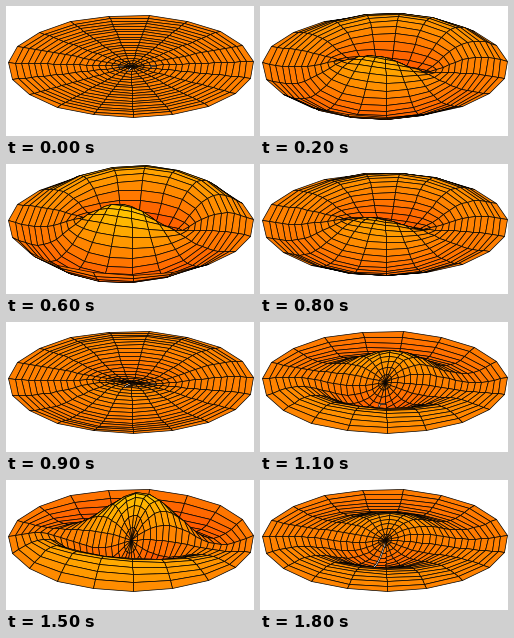
Write a matplotlib script that moves like this. It is 248 by 130 pixels and loops after 1900 ms.

```python
import numpy as np
import matplotlib.pyplot as plt
from matplotlib.animation import FuncAnimation
from matplotlib.collections import PolyCollection

W, H, DPI = 248, 130, 72
FRAMES, INTERVAL = 19, 100
N = 20                       # grid points along radius and angle
ZERO = 7.0156                # second zero of the Bessel function J1
CENTER = (125.2, 60.3)
SCALE_X, SCALE_DEPTH, SCALE_Z = 122.8, 51.0, 60.0
AZIMUTH = np.radians(108)


def bessel1(x):
    tau = (np.arange(200) + 0.5) * np.pi / 200
    return np.cos(tau - x[..., None] * np.sin(tau)).mean(axis=-1)


def quads(grid):
    """Corner values of every mesh cell, shape (cells, 4)."""
    corners = (grid[:-1, :-1], grid[1:, :-1], grid[1:, 1:], grid[:-1, 1:])
    return np.stack([c.ravel() for c in corners], axis=1)


def snap(values):
    """Move coordinates to pixel centres so that thin lines stay crisp."""
    return np.floor(values) + 0.5


r, theta = np.meshgrid(np.linspace(0, 1, N), np.linspace(0, 2 * np.pi, N))
x, y = r * np.cos(theta), r * np.sin(theta)
mode = bessel1(ZERO * r) * np.cos(theta)

across = x * np.cos(AZIMUTH) + y * np.sin(AZIMUTH)
depth = -x * np.sin(AZIMUTH) + y * np.cos(AZIMUTH)

# Paint cells from back to front.
order = np.argsort(-quads(depth).mean(axis=1))
screen_x = quads(CENTER[0] + SCALE_X * across)[order]
flat_y = quads(CENTER[1] - SCALE_DEPTH * depth)[order]
height = quads(mode)[order]

fig = plt.figure(figsize=(W / DPI, H / DPI), dpi=DPI, facecolor="white")
ax = fig.add_axes([0, 0, 1, 1])
ax.set_xlim(0, W)
ax.set_ylim(H, 0)
ax.axis("off")

drum = PolyCollection([], edgecolors="black", linewidths=0.7,
                      joinstyle="round", cmap="autumn")
drum.set_clim(-1, 1)
ax.add_collection(drum)


def update(i):
    z = height * np.sin(2 * np.pi * i / FRAMES)
    corners = np.stack([screen_x, flat_y - SCALE_Z * z], axis=-1)
    drum.set_verts(snap(corners))
    drum.set_array(z[:, 0])
    return (drum,)


anim = FuncAnimation(fig, update, frames=FRAMES, interval=INTERVAL,
                     repeat=True, repeat_delay=0)
plt.show()
```
